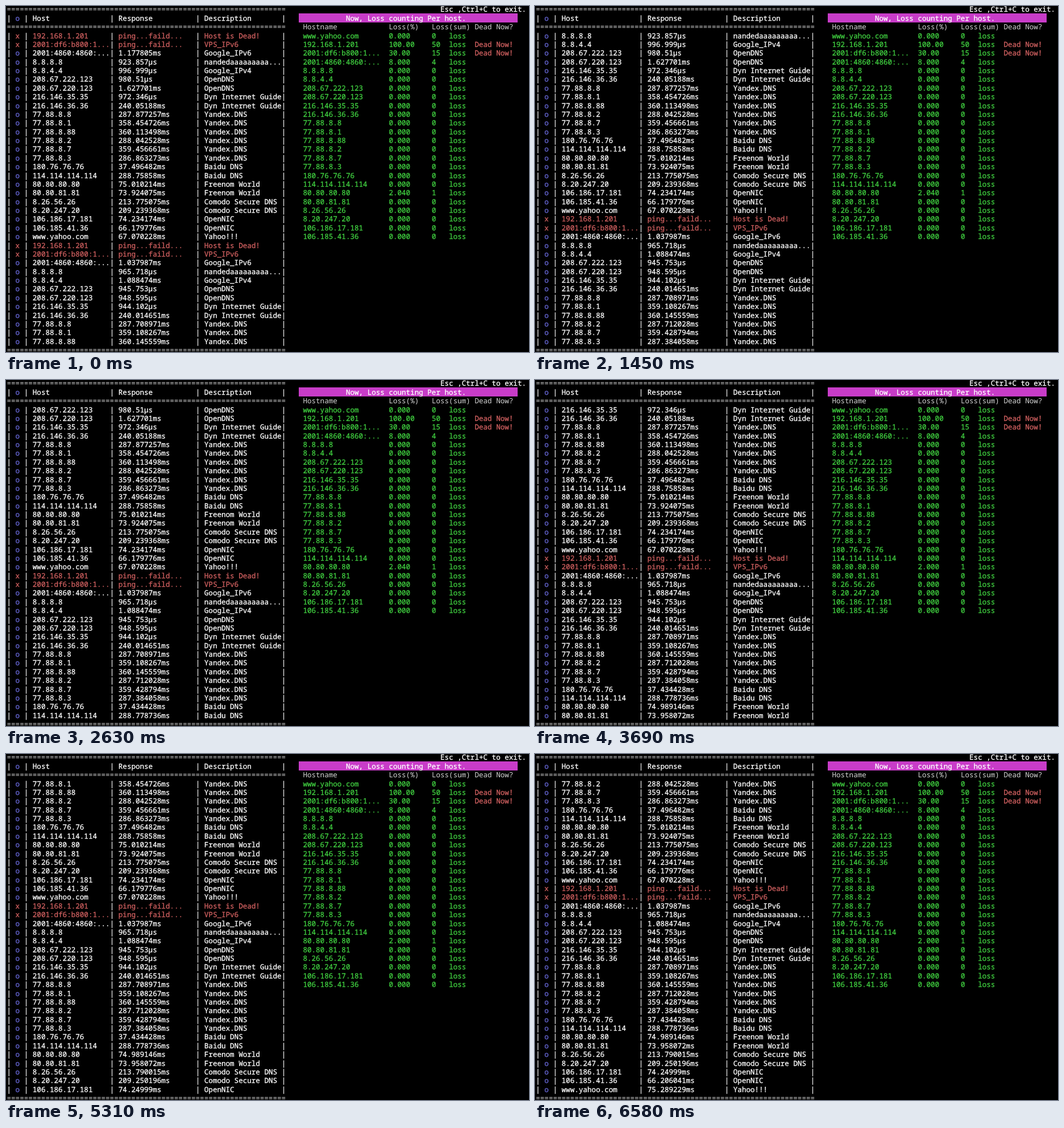
An HTML page that plays this animation: 920 px wide and 609 px high, repeating every 8 s.

```html
<!DOCTYPE html>
<html lang="en">
<head>
<meta charset="utf-8">
<title>Ping monitor</title>
<style>
  html, body { margin: 0; width: 100%; height: 100%; overflow: hidden; background: #000; }
  #screen {
    position: relative; width: 920px; height: 609px; overflow: hidden; background: #000;
    font: 12.583px/17px "Noto Sans Mono", "DejaVu Sans Mono", monospace;
    text-rendering: geometricPrecision; font-variant-ligatures: none;
  }
  #screen span { position: absolute; white-space: pre; -webkit-text-stroke: 0.3px currentColor; }
  #bar { position: absolute; left: 515px; top: 13px; width: 385px; height: 16px; background: #c83cc8; }
  .white { color: #fff; }
  #screen .plain { color: #d4d4d4; -webkit-text-stroke-width: 0; }
  .red { color: #d06060; }
  .green { color: #40d040; }
  .blue { color: #6868d8; }
</style>
</head>
<body>
<div id="screen"><div id="bar"></div></div>
<script>
const LOOP = 8000, CELL = 7.55, LINE = 15.375, ROWS = 36, TOP = 3;
const screen = document.getElementById('screen');

// host | description | first reply | second reply
const hosts = `192.168.1.201|Host is Dead!
2001:df6:b800:1...|VPS_IPv6
2001:4860:4860:...|Google_IPv6|1.177805ms|1.037987ms
8.8.8.8|nandedaaaaaaaaa...|923.857µs|965.718µs
8.8.4.4|Google_IPv4|996.999µs|1.088474ms
208.67.222.123|OpenDNS|980.51µs|945.753µs
208.67.220.123|OpenDNS|1.627701ms|948.595µs
216.146.35.35|Dyn Internet Guide|972.346µs|944.102µs
216.146.36.36|Dyn Internet Guide|240.05188ms|240.014651ms
77.88.8.8|Yandex.DNS|287.877257ms|287.708971ms
77.88.8.1|Yandex.DNS|358.454726ms|359.108267ms
77.88.8.88|Yandex.DNS|360.113498ms|360.145559ms
77.88.8.2|Yandex.DNS|288.042528ms|287.712028ms
77.88.8.7|Yandex.DNS|359.456661ms|359.428794ms
77.88.8.3|Yandex.DNS|286.863273ms|287.384058ms
180.76.76.76|Baidu DNS|37.496482ms|37.434428ms
114.114.114.114|Baidu DNS|288.75858ms|288.778736ms
80.80.80.80|Freenom World|75.010214ms|74.989146ms
80.80.81.81|Freenom World|73.924075ms|73.958072ms
8.26.56.26|Comodo Secure DNS|213.775075ms|213.790015ms
8.20.247.20|Comodo Secure DNS|209.239368ms|209.250196ms
106.186.17.181|OpenNIC|74.234174ms|74.24999ms
106.185.41.36|OpenNIC|66.179776ms|66.206041ms
www.yahoo.com|Yahoo!!!|67.070228ms|75.289229ms`.split('\n').map(line => line.split('|'));

// [loss %, loss count, dead] by host
const losses = {
  '192.168.1.201': ['100.00', '50', true],
  '2001:df6:b800:1...': ['30.00', '15', true],
  '2001:4860:4860:...': ['8.000', '4'],
  '80.80.80.80': ['2.040', '1']
};

// [time, index of the top entry, rows already redrawn]
const steps = [
  [0, 0], [310, 1], [870, 2], [1450, 3], [2020, 4], [2480, 5, 3], [2630, 5],
  [3090, 6], [3690, 7], [4270, 8], [4700, 9], [5310, 10], [5880, 11],
  [6430, 12, 4], [6580, 12]
];
const LOSS_UPDATE = 3220;

function put(row, col, text, color) {
  const span = document.createElement('span');
  span.style.left = 1.5 + col * CELL + 'px';
  span.style.top = Math.floor(57 + (row - TOP) * LINE) - 13 + 'px';
  span.textContent = text;
  span.className = color;
  screen.append(span);
  return span;
}

function pipes(row) {
  for (const col of [0, 4, 24, 44, 64]) put(row, col, '|', 'white');
}

function entry(index) {
  const [host, desc, ...replies] = hosts[index % hosts.length];
  const reply = replies[Math.floor(index / hosts.length)];
  const color = reply ? 'white' : 'red';
  return [
    [reply ? 'o' : 'x', reply ? 'blue' : 'red'],
    [host, color],
    [reply || 'ping...faild...', color],
    [desc, color]
  ];
}

// Left table
for (const row of [0, 2, TOP + ROWS]) put(row, 0, '='.repeat(65), 'plain');
pipes(1);
put(1, 2, 'o', 'blue');
put(1, 6, 'Host', 'white');
put(1, 26, 'Response', 'white');
put(1, 46, 'Description', 'white');

const table = Array.from({ length: ROWS }, (_, r) => {
  pipes(TOP + r);
  return [2, 6, 26, 46].map(col => put(TOP + r, col, '', 'white'));
});

// Right table
put(0, 101, 'Esc ,Ctrl+C to exit.', 'white');
put(1, 79, 'Now, Loss counting Per host.', 'white');
put(2, 69, 'Hostname', 'plain');
put(2, 89, 'Loss(%)', 'plain');
put(2, 99, 'Loss(sum)', 'plain');
put(2, 109, 'Dead Now?', 'plain');

let changingLoss;
[hosts[hosts.length - 1], ...hosts.slice(0, -1)].forEach(([host], i) => {
  const row = TOP + i;
  const [percent, sum, dead] = losses[host] || ['0.000', '0'];
  put(row, 69, host, 'green');
  const cell = put(row, 89, percent, 'green');
  put(row, 99, sum, 'green');
  put(row, 103, 'loss', 'green');
  if (dead) put(row, 109, 'Dead Now!', 'red');
  if (host === '80.80.80.80') changingLoss = cell;
});

function drawTable([, first, done = ROWS]) {
  table.forEach((cells, r) => {
    const fresh = entry(first + r);
    const stale = r < done ? fresh : entry(first + r - 1);
    cells.forEach((cell, c) => {
      // The row being redrawn has its mark and host renewed first.
      const [text, color] = r === done && c < 2 ? fresh[c] : stale[c];
      cell.textContent = text;
      cell.className = color;
    });
  });
}

let shown;
function tick() {
  const time = performance.now() % LOOP;
  const step = steps.filter(([start]) => start <= time).pop();
  if (step !== shown) drawTable(shown = step);
  const percent = time < LOSS_UPDATE ? '2.040' : '2.000';
  if (changingLoss.textContent !== percent) changingLoss.textContent = percent;
  requestAnimationFrame(tick);
}
tick();
</script>
</body>
</html>
```
